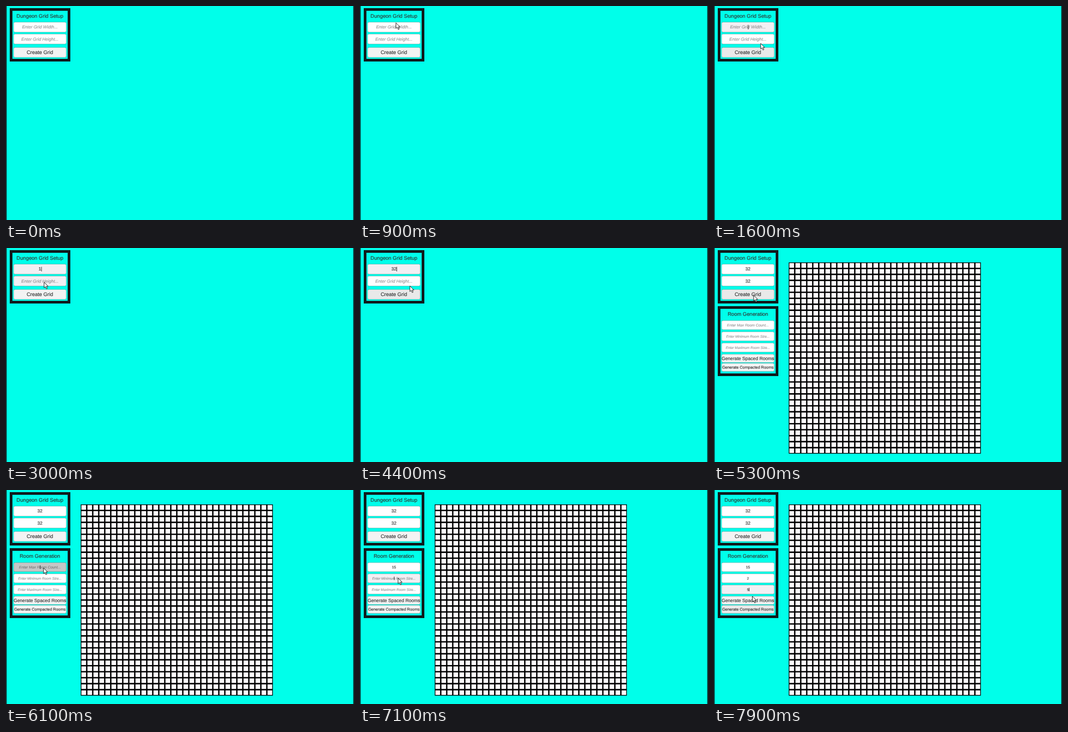
Animation, 649 px wide and 401 px high, one loop 8000 ms. Source, as an HTML page:

```html
<!DOCTYPE html>
<html lang="en">
<head>
<meta charset="utf-8">
<title>Dungeon Grid Setup</title>
<style>
html, body { margin: 0; width: 100%; height: 100%; overflow: hidden; background: #00ffea; }
svg { display: block; width: 649px; height: 401px; }
text {
  font-family: "Liberation Sans", Arial, sans-serif; text-anchor: middle; fill: #323232;
  text-rendering: geometricPrecision; stroke: #323232; stroke-width: .15;
}
.hint { font-style: italic; opacity: .5; }
.box { stroke: #465a5a; stroke-opacity: .45; stroke-width: .8; }
.panel { fill: none; stroke: #101a1c; stroke-width: 5; }
</style>
</head>
<body>
<svg id="stage" viewBox="0 0 649 401"></svg>
<script>
const LOOP = 8000, STEP = 100, BLINK = 588, MID = 63.2;
const WHITE = '#fefeff', REST = '#f3f3f3', HOVER = '#e9e9e9', SOFT = '#f2eff3', DOWN = '#c6c6c6';
const stage = document.getElementById('stage');

function add(tag, attrs, parent = stage, label = '') {
  const el = document.createElementNS('http://www.w3.org/2000/svg', tag);
  for (const k in attrs) el.setAttribute(k, attrs[k]);
  el.textContent = label;
  parent.appendChild(el);
  return el;
}

function write(label, y, size, parent, cls = '') {
  return add('text', { x: MID, y: y + size * 0.34, 'font-size': size, class: cls }, parent, label);
}

function panel(y, h, title, parent) {
  add('rect', { x: 9.5, y: y + 2.5, width: 108, height: h - 5, class: 'panel' }, parent);
  write(title, y + 15, 9.57, parent);
}

function box(y, h, parent) {
  return add('rect', { x: 14.2, y, width: 98.2, height: h, rx: 2.8, class: 'box' }, parent);
}

function button(y, h, label, size, parent) {
  const rect = box(y, h, parent);
  write(label, y + h / 2, size, parent);
  return {
    y, h,
    show: s => rect.setAttribute('fill', s.down ? DOWN : s.over ? HOVER : REST)
  };
}

function field(y, h, label, hintSize, size, parent) {
  const rect = box(y, h, parent), mid = y + h / 2;
  const hint = write(label, mid, hintSize, parent, 'hint');
  const value = write('', mid, size, parent);
  const caret = add('rect', { y: mid - size / 2, width: 0.9, height: size, fill: '#222' }, parent);
  return {
    y, h,
    show(s) {
      rect.setAttribute('fill', s.down ? DOWN : s.over || s.focus ? SOFT : WHITE);
      hint.style.display = s.text ? 'none' : '';
      value.textContent = s.text;
      caret.style.display = s.caret ? '' : 'none';
      caret.setAttribute('x', MID + s.text.length * size * 0.278 + 0.2);
    }
  };
}

add('rect', { width: 649, height: 401, fill: '#00ffea' });
add('path', { d: 'M0 0h1.2v401h-1.2zM647.7 0h1.3v401h-1.3z', fill: '#06201f' });

panel(4, 100, 'Dungeon Grid Setup', stage);
const later = add('g', {});
panel(109, 131, 'Room Generation', later);
const ui = [
  field(30.2, 18.8, 'Enter Grid Width...', 8.12, 8.5, stage),
  field(52.5, 18.8, 'Enter Grid Height...', 8.12, 8.5, stage),
  button(77.7, 18.6, 'Create Grid', 9.57, stage),
  field(136, 17, 'Enter Max Room Count...', 6.9, 6.8, later),
  field(157, 17, 'Enter Minimum Room Size...', 6.35, 6.4, later),
  field(178, 17, 'Enter Maximum Room Size...', 6.35, 6.4, later),
  button(199, 15.4, 'Generate Spaced Rooms', 8.7, later),
  button(216, 15.2, 'Generate Compacted Rooms', 7.4, later)
];
const create = ui[2];

const CELLS = 32, LEFT = 139.4, TOP = 27, SIDE = 358.3, GAP = 1.3;
const pitch = SIDE / CELLS, cell = pitch - 2 * GAP;
let cells = '';
for (let r = 0; r < CELLS; r++) {
  for (let c = 0; c < CELLS; c++) {
    cells += `M${LEFT + c * pitch + GAP} ${TOP + r * pitch + GAP}h${cell}v${cell}h${-cell}z`;
  }
}
add('rect', { x: LEFT, y: TOP, width: SIDE, height: SIDE }, later);
add('path', { d: cells, fill: '#fffcff' }, later);

const cursor = add('path', {
  d: 'M0 0V10.6L2.5 8.4L4.3 12.5L6.1 11.7L4.3 7.8H7.6Z',
  fill: '#fff', stroke: '#111', 'stroke-width': 0.9, 'stroke-linejoin': 'round'
});

// start, duration, x, y: the pointer rests between moves
const moves = [
  [400, 400, 66, 25], [800, 200, 68, 38], [1200, 200, 112, 86], [1400, 200, 87, 70],
  [1600, 500, 70, 68], [2200, 200, 79, 66], [2400, 300, 71, 64], [3400, 200, 80, 63],
  [3800, 300, 107, 81], [4300, 200, 79, 61], [4500, 400, 74, 88.5], [5600, 400, 70, 146],
  [6700, 200, 71, 165], [7200, 200, 72, 184], [7600, 200, 72, 220], [7800, 100, 71.5, 199]
];
const clicks = [1200, 4500, 5200, 6100, 6900, 7400];
const keys = [
  [2900, '1'], [3900, '\b'], [4000, '3'], [4100, '2'], [4700, '3'], [4800, '2'],
  [6500, '1'], [6600, '5'], [7200, '2'], [7700, '5']
];

function pointer(t) {
  let px = 84, py = 71;
  for (const [start, length, x, y] of moves) {
    const k = Math.min(1, Math.max(0, (t - start) / length));
    const e = k * k * (3 - 2 * k);
    px += (x - px) * e;
    py += (y - py) * e;
  }
  return [px, py];
}

function hit(t) {
  const [x, y] = pointer(t);
  return t < 400 || x > 113 ? undefined : ui.find(c => y >= c.y && y <= c.y + c.h);
}

// Replay clicks and keys to find the focus, the typed text and the caret phase.
function replay(t) {
  const text = new Map(ui.map(c => [c, '']));
  const inputs = [...clicks.map(at => [at]), ...keys].sort((a, b) => a[0] - b[0]);
  let focus, last = 0;
  for (const [at, key] of inputs) {
    if (at > t) break;
    last = at;
    if (!key) focus = hit(at);
    else text.set(focus, key === '\b' ? text.get(focus).slice(0, -1) : text.get(focus) + key);
  }
  return { text, focus, lit: Math.floor((t - last) / BLINK) % 2 === 0 };
}

function draw(t) {
  const { text, focus, lit } = replay(t);
  const over = hit(t - STEP); // highlights trail the pointer by one step
  for (const c of ui) {
    c.show({
      text: text.get(c),
      over: c === over,
      focus: c === focus,
      caret: c === focus && lit,
      down: c === focus && clicks.includes(t)
    });
  }
  const made = clicks.find(at => hit(at) === create) + STEP;
  later.style.display = t >= made ? '' : 'none';
  cursor.style.display = t >= 400 ? '' : 'none';
  cursor.setAttribute('transform', `translate(${pointer(t)})`);
}

function tick() {
  const t = performance.now() % LOOP;
  draw(t - t % STEP);
  requestAnimationFrame(tick);
}
tick();
</script>
</body>
</html>
```
